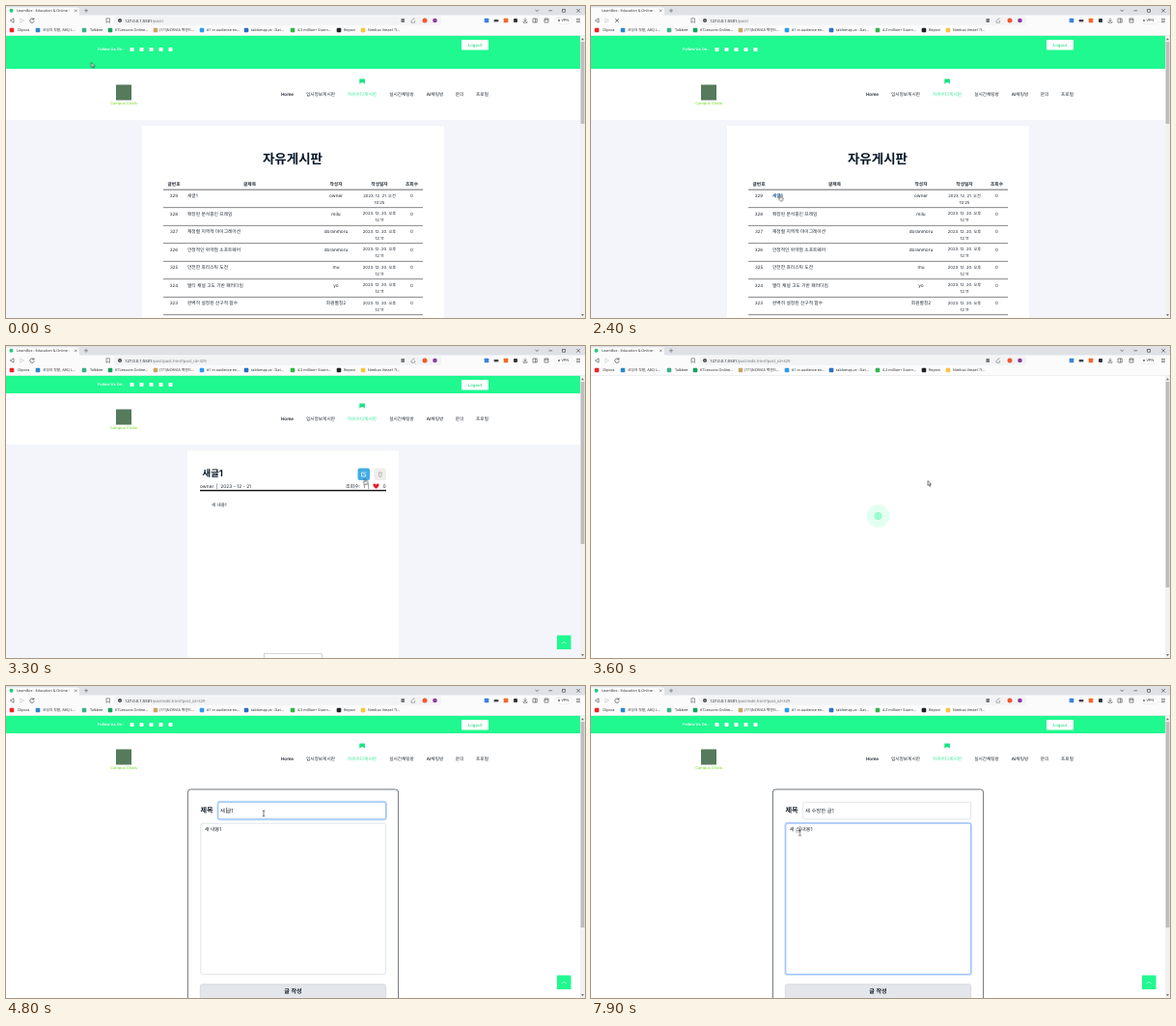
These frames come from a looping animation (600x323 px, 8000 ms). An HTML page:

```html
<!DOCTYPE html>
<html lang="ko">
<head>
<meta charset="utf-8">
<title>Board demo</title>
<style>
  html, body { margin: 0; width: 100%; height: 100%; overflow: hidden; background: #fff; }
  svg { display: block; width: 100vw; height: 100vh; }
  text { font-family: Inter, "Noto Sans CJK KR", "Noto Sans CJK", sans-serif; text-rendering: geometricPrecision; white-space: pre; }
  .ui text { font-family: "Noto Sans", "Noto Sans CJK KR", "Noto Sans CJK", sans-serif; }
  .pulse { transform-origin: 297.5px 176px; animation: pulse .8s linear infinite; }
  .pulse.a { animation-delay: -.208s; }
  .pulse.b { animation-delay: -.608s; }
  @keyframes pulse {
    from { transform: scale(0); opacity: .5; }
    to { transform: scale(1); opacity: 0; }
  }
  .pointer { animation: travel 8s ease-in-out infinite; }
  @keyframes travel {
    0% { transform: translate(88.5px, 58.5px); }
    11.25% { transform: translate(150px, 172px); }
    21% { transform: translate(191px, 204px); }
    27.5%, 31.25% { transform: translate(195.5px, 195.5px); }
    40%, 42.5% { transform: translate(371.5px, 137px); }
    45% { transform: translate(349px, 139.5px); }
    51.5%, 71.5% { transform: translate(267px, 132px); }
    77.5%, 100% { transform: translate(216.5px, 152px); }
  }
</style>
</head>
<body>
<svg id="stage" viewBox="0 0 600 323" preserveAspectRatio="none"></svg>
<script>
const LOOP = 8000;
const GREEN = '#1ff98f', INK = '#1c2530', GREY = '#5f6368';
const rules = [];

const rect = (x, y, w, h, fill, extra = '') =>
  `<rect x="${x}" y="${y}" width="${w}" height="${h}" fill="${fill}" ${extra}/>`;
const dot = (x, y, r, fill, extra = '') =>
  `<circle cx="${x}" cy="${y}" r="${r}" fill="${fill}" ${extra}/>`;
const line = (d, stroke, width = .6, extra = '') =>
  `<path d="${d}" fill="none" stroke="${stroke}" stroke-width="${width}" ${extra}/>`;

// y is the vertical middle of the text
const text = (x, y, string, size, { fill = INK, weight = 400, anchor = 'start' } = {}) =>
  `<text x="${x}" y="${y + size * .36}" font-size="${size}" fill="${fill}" font-weight="${weight}" text-anchor="${anchor}">${string.replace(/&/g, '&amp;')}</text>`;
const centred = (x, y, string, size, style = {}) => text(x, y, string, size, { ...style, anchor: 'middle' });

// Shows content only inside the given [start, end) ranges, in ms
function during(ranges, content) {
  const name = 'show' + rules.length;
  const on = t => ranges.some(([a, b]) => t >= a && t < b) ? 1 : 0;
  const stops = [...new Set([0, ...ranges.flat(), LOOP])].sort((a, b) => a - b);
  rules.push(`@keyframes ${name}{${stops.map(t => `${t / LOOP * 100}%{opacity:${on(t)}}`).join('')}}`);
  return `<g style="animation:${name} 8s step-end infinite">${content}</g>`;
}

// Each step is [start, content] and lasts until the next one
const sequence = (steps, end) =>
  steps.map(([start, content], i) => during([[start, steps[i + 1]?.[0] ?? end]], content)).join('');

const LIST = [0, 2500], LOAD_POST = [2500, 2850], POST = [2850, 3400], LOAD_EDIT = [3400, 3850], EDIT = [3850, LOOP];

function browser() {
  const loading = [[2300, 2500]], ready = [[0, 2300], [2500, LOOP]];
  const bookmarks = [
    [6, 12, '#f0242b', 'Clipora'], [33, 38, '#2f86c8', '코딩의 첫발, ABQ L...'],
    [81, 87, '#3fae8c', 'Talkbee'], [108, 113, '#18a05e', 'K7Lessons Online...'],
    [155, 159, '#c9a56a', '(7기)NORVIA 백엔드...'], [203, 208, '#2f9bea', '#1 in audience en...'],
    [249, 254, '#2b6fc4', 'tablomap.zz - Dat...'], [297, 302, '#35b44a', '4.2 million+ Stunn...'],
    [345, 350, '#202124', 'Repovi'], [370, 375, '#f6c544', 'Nimbus Vessel 가...']
  ];
  const path = s => `127.0.0.1:5501<tspan fill="#777">/post/${s}</tspan>`;
  const address = s => text(123, 15, path(s), 4.2, { fill: '#222' });
  return `<g class="ui">
    ${rect(0, 0, 600, 10, '#dee1e6')}
    <path d="M0 10V1.5H74Q76 1.5 76 4V10Z" fill="#fbfbfc"/>
    ${during(ready, dot(5.5, 4.7, 2, '#25c878'))}
    ${text(11, 4.8, 'LearnBox - Education & Online -', 3.7, { fill: '#333' })}
    ${line('M71 3.5l2.6 2.6m0-2.6l-2.6 2.6M81 4.8h4m-2-2v4', '#444', .5)}
    ${line('M548.5 3.8l1.7 1.7 1.7-1.7M562.5 4.8h3.6M591.3 3l3.6 3.6m0-3.6l-3.6 3.6', '#333', .6)}
    ${rect(576.7, 3.6, 2.6, 2.6, 'none', 'stroke="#333" stroke-width=".6"')}
    ${rect(0, 9.5, 600, 21, '#fbfbfc')}
    ${rect(112, 10.5, 339, 9.3, '#f1f3f5', 'rx="2"')}
    ${line('M8 12.8v4.4l-3.6-2.2z', '#444')}
    ${line('M14.8 12.8v4.4l3.6-2.2z', '#c3c6ca')}
    ${during(ready, line('M28.6 13.6A2.2 2.2 0 1 0 29.2 15.4M29 12.3v1.7h-1.8', '#444', .7))}
    ${during(loading, line('M25.2 13.2l3.6 3.6m0-3.6l-3.6 3.6', '#444', .7))}
    ${line('M104 12.8h3.4v4.6l-1.7-1.3-1.7 1.3z', '#555')}
    ${dot(118, 15, 2, '#444')}${rect(117.7, 14.5, .6, 1.6, '#fff')}
    ${during([LIST], address(''))}
    ${during([LOAD_POST, POST], address('post.html?post_id=329'))}
    ${during([LOAD_EDIT, EDIT], address('edit.html?post_id=329'))}
    ${rect(409.5, 13, 3.4, 4, '#777')}
    ${line('M420 15v2.2h3.6V15M420.8 15q.5-2 2.8-2', '#777')}
    ${dot(434, 15, 2.5, '#f4572b')}${dot(444.5, 15, 2.3, '#8b3aa0')}
    ${rect(495.7, 12.7, 4.6, 4.6, '#3c82dc', 'rx=".6"')}
    ${rect(505.7, 14, 4.6, 2.4, '#43464a')}
    ${rect(515.7, 12.7, 4.6, 4.6, '#f06a26', 'rx=".5"')}
    ${rect(526, 13, 4, 4, '#33363a', 'rx="1"')}
    ${line('M538 12.5v3.4m-1.5-1.5l1.5 1.5 1.5-1.5M536 16v1.2h4V16M546 13h4.2v4H546zm2.6 0v4M558 13h4v4h-4zM558 14.2h4', '#444')}
    ${rect(569, 11.5, 18, 7, '#fff', 'rx="3" stroke="#ddd" stroke-width=".4"')}
    ${dot(573, 15, 1, GREY)}${text(575.4, 15, 'VPN', 4, { fill: '#333' })}
    ${line('M591 13.4h4M591 15h4M591 16.6h4', '#444', .6)}
    ${bookmarks.map(([ix, tx, fill, label]) => rect(ix - 2.3, 22.8, 4.6, 4.4, fill, 'rx="1"') + text(tx, 25, label, 3.75, { fill: '#333' })).join('')}
    ${rect(0, 30, 600, .6, '#e3e5e8')}
  </g>`;
}

function scrollbar(bottom) {
  return rect(595, 30.5, 5, 293, '#f1f1f1') + rect(595.6, 37, 3.8, bottom - 37, '#bdbdbd') +
    '<path d="M596 35.2h3l-1.5-2zM596 319h3l-1.5 2z" fill="#666"/>';
}

function siteHeader(barEnd, followY, navY) {
  const nav = [
    [291.5, 'Home', 600], [326, '입시정보게시판'], [369, '자유수다게시판'], [410, '실시간채팅방'],
    [444.5, 'AI채팅방', 500], [470, '문의'], [493.5, '프로필']
  ];
  return rect(0, 30.5, 595, barEnd - 30.5, GREEN) +
    rect(0, barEnd, 595, 53, '#fff') +
    text(95, followY, 'Follow Us On :', 4, { fill: '#fff', weight: 600 }) +
    [130.5, 140.5, 150.5, 160.5, 170.5].map(x => rect(x - 2, followY - 2, 4, 4, '#fff', 'rx=".8"')).join('') +
    rect(472, 35, 28, 10.5, '#fff', 'rx="1"') +
    centred(486, 40.2, 'Logout', 4.3, { fill: '#24d981', weight: 500 }) +
    rect(114, navY - 9.5, 16, 16, '#557a5c') +
    centred(122, navY + 9.2, 'Campus Chats', 4, { fill: '#86e03a', weight: 500 }) +
    `<path d="M366.3 ${navY - 15.5}h5.6v5.2l-1.8-1.4h-2l-1.8 1.4z" fill="#16e582"/>` +
    nav.map(([x, label, weight = 400]) =>
      centred(x, navY, label, 4.65, { weight, fill: x === 369 ? '#2fe892' : INK })).join('');
}

const topButton = rect(571, 299.5, 14.5, 14.5, GREEN) + line('M576.3 308l2-2 2 2', '#fff', .7);

function listPage() {
  const rows = [
    ['새글1', 'owner'], ['확장된 분석중인 프레임', 'milu'], ['재정렬 지역적 마이그레이션', 'doranmoru'],
    ['안정적인 위약점 소프트웨어', 'doranmoru'], ['안전한 휴리스틱 도전', 'mu'],
    ['멀티 채널 고도 기반 패러다임', 'yo'], ['완벽히 설정된 선구적 함수', '회원별칭2']
  ];
  const heads = [[174, '글번호'], [252.5, '글제목'], [342, '작성자'], [387, '작성일자'], [420.5, '조회수']];
  const body = rows.map(([title, author], i) => {
    const y = 196.4 + i * 18.5;
    return centred(174, y, String(329 - i), 4.5) + text(188, y, title, 4.75) + centred(342, y, author, 4.75) +
      centred(387, y, i ? '2023. 12. 20. 오후' : '2023. 12. 21. 오전', 4.2) +
      centred(387, y + 6.6, i ? '12:11' : '10:25', 4.2) + centred(420.5, y, '0', 4.5) +
      rect(163, y + 12, 269, .7, '#555');
  }).join('');
  return rect(0, 30, 600, 293, '#f3f5fa') + siteHeader(65, 45, 91) + rect(141, 124, 313, 199, '#fff') +
    centred(297, 158, '자유게시판', 13.5, { fill: '#081828', weight: 700 }) +
    heads.map(([x, label]) => centred(x, 184, label, 4.7, { weight: 600 })).join('') +
    rect(163, 189.7, 269, .8, '#444') + body +
    during([[2100, 2500]], text(188, 196.4, '새글1', 4.75, { fill: '#3b8fe0' })) + scrollbar(122);
}

function postPage() {
  return rect(0, 30, 600, 293, '#f3f5fa') + siteHeader(49, 40, 75) + rect(188, 108.5, 219, 215, '#fff') +
    text(203.5, 131.5, '새글1', 9.4, { fill: '#081828', weight: 700 }) +
    rect(364.5, 126.5, 12.5, 12.5, '#41ade6', 'rx="2"') +
    line('M371 131h-2.5v4h4v-2.3M370.2 133.2l3-3', '#fff', .7) +
    rect(381.5, 126.5, 12.5, 12.5, '#f0eeeb', 'rx="2"') +
    line('M386 131.2h3.6M386.5 131.2v4h2.6v-4M387.2 130.3h1.2', '#999', .6) +
    text(201, 145, 'owner  |  2023 - 12 - 21', 4.85) +
    text(352, 145, '조회수:  1  |', 5) +
    '<path d="M383.5 147.8C377.6 143.6 381.6 140.8 383.5 143.5C385.4 140.8 389.4 143.6 383.5 147.8Z" fill="#e8202e"/>' +
    centred(392, 145, '0', 5) + rect(201, 148.9, 193, 1.4, '#111') +
    text(213, 164.3, '새 내용1', 4.55) +
    rect(267.5, 318.3, 60, 9, '#fff', 'stroke="#bbb" stroke-width=".6"') + topButton + scrollbar(205);
}

const preloader = rect(0, 30, 600, 293, '#fff') +
  ['a', 'b'].map(k => dot(297.5, 176, 15.6, GREEN, `class="pulse ${k}"`)).join('') + scrollbar(250);

function field(x, y, w, h, focus) {
  const box = (extra, grow = 0) =>
    rect(x - grow, y - grow, w + 2 * grow, h + 2 * grow, 'none', `rx="${2 + grow}" ${extra}`);
  return box('stroke="#d5d9de" stroke-width=".7"') +
    during(focus, box('stroke="#c2dbfe" stroke-width="1.2"', .8) + box('stroke="#7fb2fb" stroke-width=".7"'));
}

const caret = (x, y) => rect(x, y - 3, .5, 6, '#111');

function editPage() {
  const typed = (x, y, size) => ([start, string]) => [start, text(x, y, string, size)];
  const title = [
    [3850, '새글1'], [4800, '새 글1'], [5000, '새 ㅅ글1'], [5100, '새 수글1'], [5200, '새 숮글1'], [5400, '새 수저글1'],
    [5500, '새 수정글1'], [5600, '새 수정하글1'], [5700, '새 수정한글1'], [5800, '새 수정한 글1']
  ].map(typed(222, 128.8, 5.35));
  const content = [
    [3850, '새 내용1'], [7700, '새  내용1'], [7800, '새 ㅅ 내용1'], [7900, '새 스 내용1']
  ].map(typed(205.8, 148, 5.1));
  const titleCarets = [
    [4200, 234.6], [4500, 231.8], [4600, 226.9], [4800, 228.2], [5000, 233.1], [5400, 238], [5600, 243], [5800, 244.2]
  ].map(([start, x]) => [start, caret(x, 128.8)]);
  const bodyCaret = during([[6400, 6600], [6900, 7200], [7400, 7700]], caret(210.7, 148)) +
    during([[7700, 7800]], caret(211.8, 148)) +
    during([[7800, LOOP]], caret(216.6, 148) + rect(211.8, 150.8, 4.6, .4, '#333'));
  return rect(0, 30, 600, 293, '#fff') + siteHeader(49, 40, 75) +
    rect(188.4, 107, 218.2, 230, '#fff', 'rx="3" stroke="#5d6570" stroke-width=".9"') +
    text(201.5, 128.5, '제목', 7.2, { weight: 700 }) +
    field(219.8, 120.2, 173.8, 17.6, [[4200, 6200]]) +
    field(201.8, 142.2, 191.8, 156.2, [[6200, LOOP]]) +
    sequence(title, LOOP) + sequence(content, LOOP) + sequence(titleCarets, 6200) + bodyCaret +
    rect(201.3, 308.8, 192.4, 20, '#e3e6ea', 'rx="2" stroke="#cfd3d8" stroke-width=".7"') +
    centred(297.5, 316, '글 작성', 6.1, { weight: 700 }) + topButton + scrollbar(250);
}

function pointer() {
  const outline = 'fill="#fff" stroke="#222" stroke-width=".6" stroke-linejoin="round"';
  const arrow = `<path d="M0 0v5l1.2-1.1.9 2 .8-.4-.9-1.9h1.6z" ${outline}/>`;
  const hand = `<path d="M0 .5q.5-.8 1 0v2l2.4.7v1.6l-.6 1.5H.6L-1 4.2l.4-.6.6.4z" ${outline}/>`;
  const beam = line('M-1.3-2.8H1.3M0-2.8v5.6M-1.3 2.8H1.3', '#222', .6);
  return `<g class="pointer">${during([[0, 2000], [2500, 3150], [3400, 3980]], arrow)}
    ${during([[2000, 2500], [3150, 3400]], hand)}${during([[3980, LOOP]], beam)}</g>`;
}

document.getElementById('stage').innerHTML =
  during([LIST], listPage()) + during([POST], postPage()) + during([EDIT], editPage()) +
  during([LOAD_POST, LOAD_EDIT], preloader) + browser() + pointer();
document.head.appendChild(document.createElement('style')).textContent = rules.join('\n');
</script>
</body>
</html>
```
